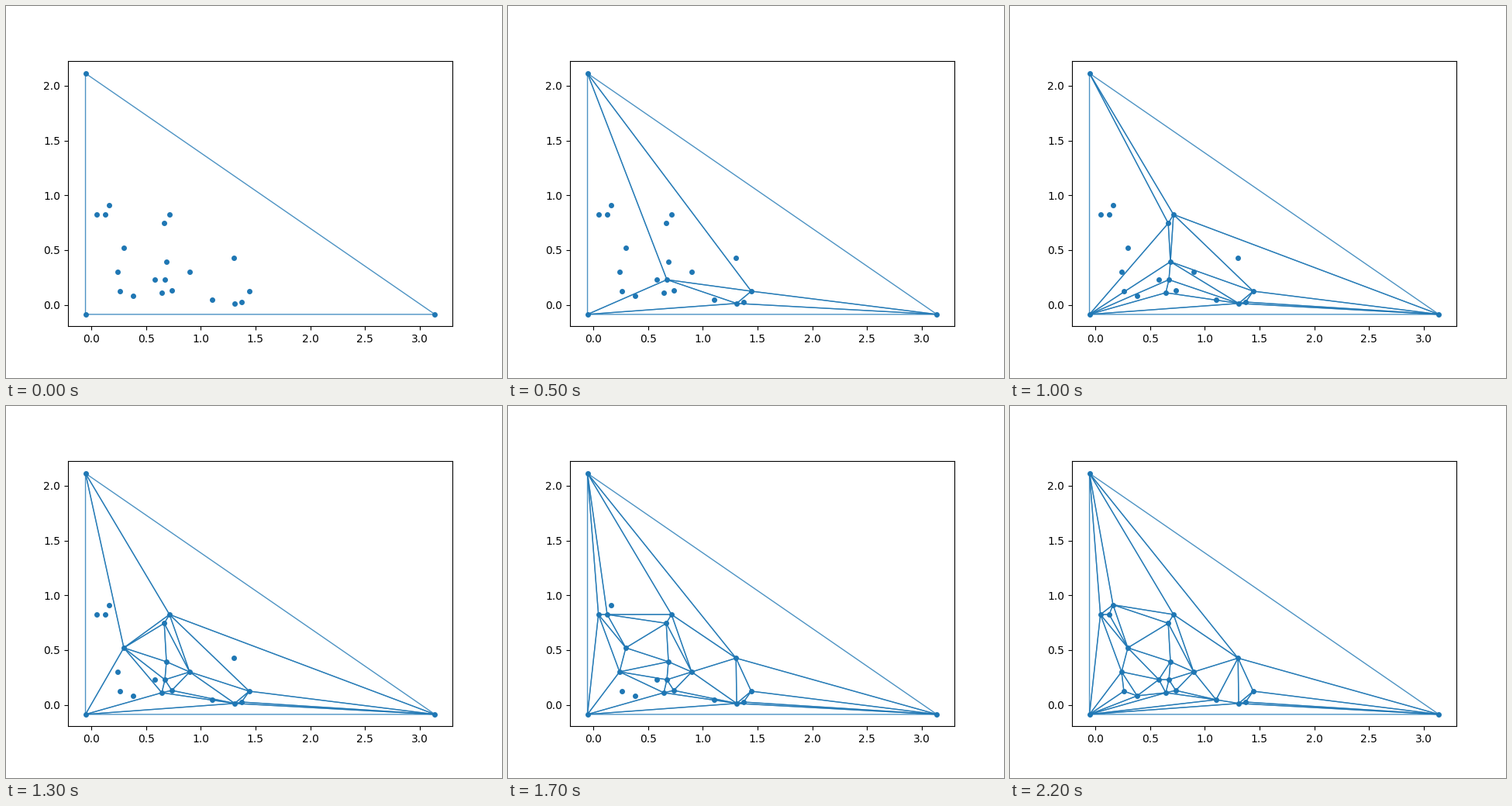
A matplotlib script that plays this animation: 640x480 px, repeating every 2300 ms.

```python
import matplotlib.pyplot as plt
import numpy as np
from matplotlib.animation import FuncAnimation
from matplotlib.collections import PolyCollection
from matplotlib.tri import Triangulation

BLUE = "#1f77b4"
MARGIN = 0.1    # gap between the sites and the enclosing triangle
HOLD = 2        # extra steps on the bare outer triangle
STEP_MS = 100

# Key points, in the order they join the mesh.
sites = np.array([
    (0.673, 0.230), (1.443, 0.125), (1.310, 0.0135), (0.715, 0.825),
    (0.667, 0.745), (0.687, 0.394), (0.645, 0.111), (1.373, 0.026),
    (0.298, 0.521), (0.899, 0.301), (0.736, 0.132), (1.304, 0.427),
    (0.128, 0.825), (0.048, 0.825), (0.241, 0.302), (0.581, 0.231),
    (0.262, 0.125), (0.383, 0.083), (0.163, 0.9135), (1.104, 0.047),
])


def enclosing(xy):
    """Right triangle with legs twice the padded bounding box."""
    low = xy.min(axis=0) - MARGIN
    legs = 2 * (xy.max(axis=0) + MARGIN - low)
    return low + legs * np.array([(0, 0), (1, 0), (0, 1)])


points = np.vstack([enclosing(sites), sites])


def delaunay(n):
    """Triangles over the three corners and the first n sites."""
    xy = points[:3 + n]
    return xy[Triangulation(*xy.T).triangles]


fig, ax = plt.subplots(figsize=(6.4, 4.8), dpi=100)
ax.set_aspect("equal")
ax.plot(*points.T, "o", color=BLUE, ms=4)
# Every triangle is outlined, so shared edges are painted twice.
mesh = PolyCollection([], facecolors="none", edgecolors=BLUE,
                      linewidths=1, alpha=0.8)
ax.add_collection(mesh, autolim=False)


def draw(i):
    mesh.set_verts(delaunay(max(0, i - HOLD)))
    return [mesh]


anim = FuncAnimation(fig, draw, frames=HOLD + 1 + len(sites),
                     interval=STEP_MS, repeat=True, repeat_delay=0)
plt.show()
```
